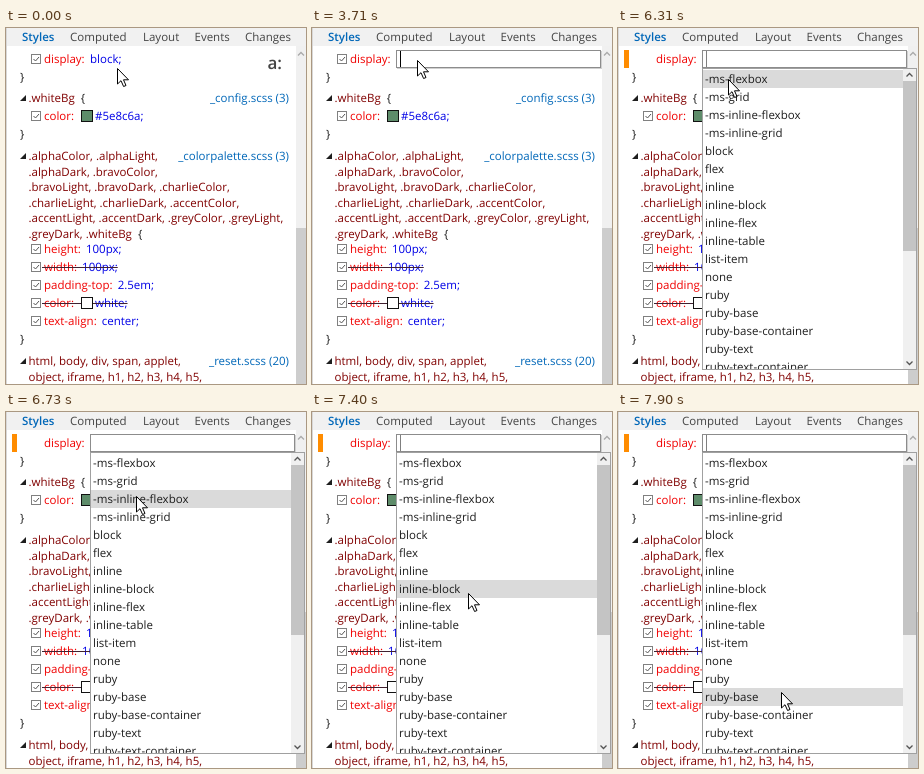
An HTML page for the animation above (8000 ms loop, 300 by 356 pixels).

```html
<!DOCTYPE html>
<html lang="en">
<head>
<meta charset="utf-8">
<style>
  html, body { margin: 0; width: 100%; height: 100%; overflow: hidden; background: #fff; }
  svg { display: block; width: 300px; height: 356px; }
  text { font: 11.5px "Open Sans", "Noto Sans", sans-serif; text-rendering: geometricPrecision; white-space: pre; }
</style>
</head>
<body>
<svg id="stage" viewBox="0 0 300 356"></svg>
<script>
const LOOP = 8000;
const CLICK = 1300, EDIT = 1460, CLEAR = 3710, OPEN = 3850, MARK = 4000, LEAVE = 6160, BROWSE = 6310;
const RED = '#f00000', BLUE = '#0000e6', MAROON = '#800000', LINK = '#0067b8', INK = '#1e1e1e';
const ROW = 18, LINE = 15.6, MENU_TOP = 42;
const stage = document.getElementById('stage');

function add(parent, tag, attrs, content) {
  const el = document.createElementNS('http://www.w3.org/2000/svg', tag);
  for (const key in attrs) el.setAttribute(key, attrs[key]);
  if (content) el.textContent = content;
  return parent.appendChild(el);
}
const group = parent => add(parent, 'g', {});
const rect = (parent, x, y, width, height, fill, more) =>
  add(parent, 'rect', { x, y, width, height, fill, ...more });
const frame = (parent, x, y, w, h, fill, stroke) =>
  rect(parent, x + .5, y + .5, w - 1, h - 1, fill, { stroke });
const path = (parent, d, more) => add(parent, 'path', { d, fill: 'none', ...more });
// y is the middle of the text row
const label = (parent, x, y, content, fill, more) =>
  add(parent, 'text', { x, y: y + 4, fill, ...more }, content);
const chevron = (parent, x, y, dir, stroke) =>
  path(parent, `M${x - 3} ${y + 1.5 * dir}l3 ${-3 * dir} 3 ${3 * dir}`, { stroke, 'stroke-width': 1.3 });

function checkbox(parent, y) {
  frame(parent, 25, y - 5, 10, 10, '#fff', '#808080');
  path(parent, `M27.5 ${y}l2 2 3.5-4`, { stroke: '#555' });
}

function declaration(y, { name, value, swatch, off }) {
  checkbox(stage, y);
  const el = label(stage, 38, y, name + ':', RED);
  add(el, 'tspan', { fill: BLUE, dx: swatch ? 21 : 5 }, value + ';');
  if (off) path(stage, `M36 ${y + .5}h${el.getBBox().width + 2}`, { stroke: '#402030' });
  if (swatch) frame(stage, 75, y - 6, 12, 12, swatch, '#111');
}

function rule(y, file, lines, firstRow, declarations) {
  path(stage, `M20 ${y - 3}v6h-6z`, { fill: INK });
  lines.forEach((line, i) => {
    const [selector, brace] = line.split('|');
    const el = label(stage, 22.5, y + i * LINE, selector, MAROON);
    if (brace) add(el, 'tspan', { fill: INK, dx: 6 }, brace);
  });
  label(stage, 283, y, file, LINK, { 'text-anchor': 'end' });
  declarations.forEach((item, i) => declaration(firstRow + i * ROW, item));
  if (declarations.length) label(stage, 14, firstRow + declarations.length * ROW, '}', INK);
}

// Style pane
rect(stage, 0, 0, 300, 18, '#f1f1f1');
rect(stage, 0, 0, 1, 356, '#d8d8d8');
label(stage, 16, 9, 'Styles', LINK, { style: 'font-weight:600' });
label(stage, 64, 9, 'Computed', '#444');
label(stage, 137, 9, 'Layout', '#444');
label(stage, 188.5, 9, 'Events', '#444');
label(stage, 239, 9, 'Changes', '#444');

rect(stage, 290, 18, 10, 338, '#f0f0f0');
rect(stage, 290, 200, 10, 156, '#cdcdcd');
chevron(stage, 295, 26, 1, '#aaa');

label(stage, 38, 31, 'display:', RED);
label(stage, 14, 49, '}', INK);
const firstCheck = group(stage);
checkbox(firstCheck, 31);
const plainValue = group(stage);
label(plainValue, 84, 31, 'block;', BLUE);
label(plainValue, 261.5, 37, 'a:', '#444', { style: 'font-size:17px;font-weight:600' });

rule(70, '_config.scss (3)', ['.whiteBg|{'], 88, [
  { name: 'color', value: '#5e8c6a', swatch: '#5e8c6a' }
]);
rule(128, '_colorpalette.scss (3)', [
  '.alphaColor, .alphaLight,',
  '.alphaDark, .bravoColor,',
  '.bravoLight, .bravoDark, .charlieColor,',
  '.charlieLight, .charlieDark, .accentColor,',
  '.accentLight, .accentDark, .greyColor, .greyLight,',
  '.greyDark, .whiteBg|{'
], 221, [
  { name: 'height', value: '100px' },
  { name: 'width', value: '100px', off: true },
  { name: 'padding-top', value: '2.5em' },
  { name: 'color', value: 'white', swatch: '#fff', off: true },
  { name: 'text-align', value: 'center' }
]);
rule(333, '_reset.scss (20)', ['html, body, div, span, applet,', 'object, iframe, h1, h2, h3, h4, h5,'], 0, []);

const changeBar = rect(stage, 6, 22, 5, 18, '#ff8c00');

// Value editor
const editor = group(stage);
rect(editor, 85, 23, 205, 18, '#d0d0d0');
frame(editor, 84, 22, 205, 18, '#fff', '#8c8c8c');
const selection = group(editor);
rect(selection, 85, 24, 28, 15, '#99c9f5');
label(selection, 85, 31, 'block', INK);
const caret = rect(editor, 88, 23, 1, 16, '#000');

// Suggestion list
const menu = group(stage);
frame(menu, 84, 40, 215, 302, '#fff', '#a0a0a0');
const hover = rect(menu, 85, MENU_TOP, 200, ROW, '#dadada');
const clip = add(stage, 'clipPath', { id: 'list' });
rect(clip, 85, 41, 200, 300);
const list = add(menu, 'g', { 'clip-path': 'url(#list)' });
('-ms-flexbox -ms-grid -ms-inline-flexbox -ms-inline-grid block flex inline inline-block inline-flex ' +
 'inline-table list-item none ruby ruby-base ruby-base-container ruby-text ruby-text-container')
  .split(' ').forEach((word, i) => label(list, 87, MENU_TOP + (i + .5) * ROW, word, INK));
rect(menu, 285, 41, 13, 300, '#f0f0f0');
rect(menu, 285, 53, 13, 170, '#c4c4c4');
chevron(menu, 291.5, 47, 1, '#555');
chevron(menu, 291.5, 335, -1, '#555');

// Pointer shapes
const clickRing = add(stage, 'circle', { cx: 106.5, cy: 33.5, r: 9.5, fill: 'none', stroke: '#8a8a8a' });
const arrow = path(stage, 'M.5 .5V16L4 12.7 6.6 18.5 9 17.5 6.5 11.8H11.5Z',
  { fill: '#fff', stroke: '#000', 'stroke-linejoin': 'round' });
const beam = path(stage, 'M-3 .5H-1L.5 1.5 2 .5H4M.5 1.5V14.5M-3 15.5H-1L.5 14.5 2 15.5H4', { stroke: '#000' });

const show = (el, on) => el.setAttribute('visibility', on ? 'visible' : 'hidden');
const between = (t, from, to) => t >= from && t < to;

// Progress from 0 to 1 in equal jumps, like a low-rate screen recording
function stepped(t, from, to, steps) {
  const n = Math.floor((t - from) / (to - from) * steps);
  return Math.min(Math.max(n, 0), steps) / steps;
}

function pointerAt(t) {
  const approach = stepped(t, 362, 1050, 5);
  const descent = stepped(t, BROWSE, 7900, 12);
  if (t >= BROWSE) return [110 + 53 * Math.sin(descent * Math.PI / 2), 51 + 229 * descent ** 1.4];
  if (t >= LEAVE) return [108, 31];
  if (t >= OPEN || between(t, EDIT, 1610)) return [107, 25];
  return [111 - 6 * approach, 40 - 8 * approach];
}

// Blink with a half-tone between on and off
function caretOpacity(t) {
  const wave = Math.cos((t - 7174) / 1089 * 2 * Math.PI);
  return (1 + Math.round(1.2 * wave + .15)) / 2;
}

function draw(now) {
  const t = now % LOOP;
  const [x, y] = pointerAt(t).map(Math.round);
  const isBeam = between(t, EDIT, 1610) || between(t, OPEN, BROWSE);
  for (const el of [arrow, beam]) el.setAttribute('transform', `translate(${x} ${y})`);
  show(arrow, !isBeam);
  show(beam, isBeam);
  show(clickRing, between(t, CLICK, EDIT));
  show(plainValue, t < EDIT);
  show(editor, t >= EDIT);
  show(selection, between(t, EDIT, CLEAR));
  caret.setAttribute('opacity', t < CLEAR ? 0 : caretOpacity(t));
  show(menu, t >= OPEN);
  show(firstCheck, t < MARK);
  show(changeBar, t >= MARK);
  hover.setAttribute('y', MENU_TOP + Math.floor((y - MENU_TOP) / ROW) * ROW);
  show(hover, t >= BROWSE);
  requestAnimationFrame(draw);
}
draw(performance.now());
</script>
</body>
</html>
```
